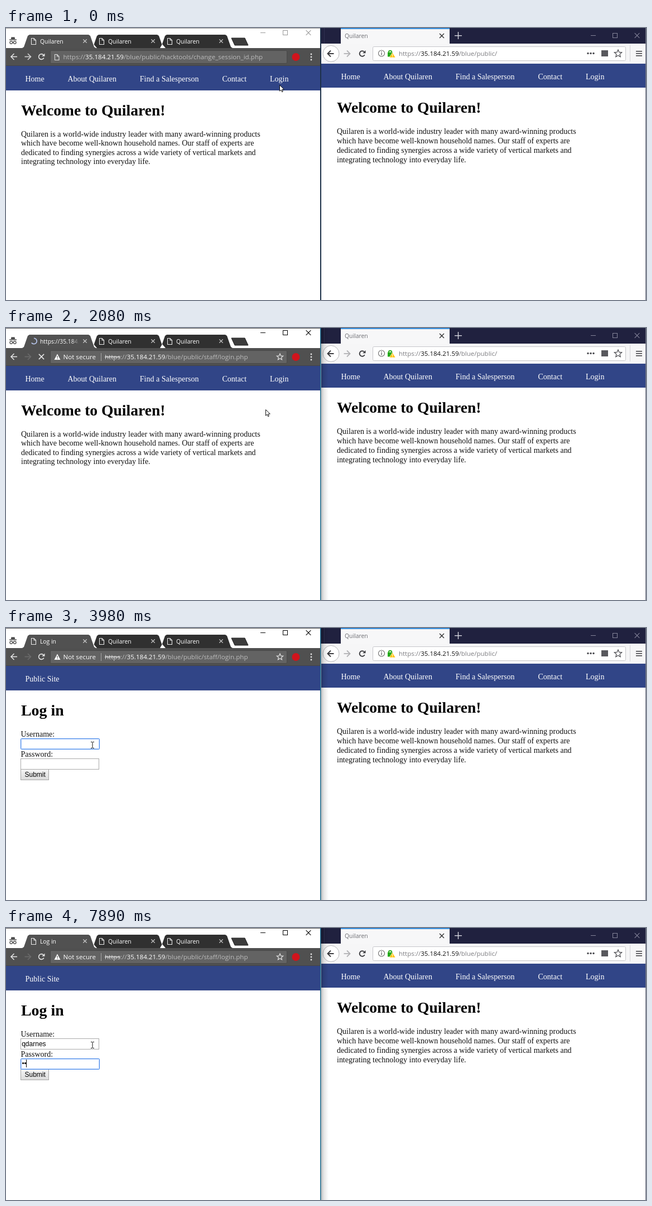
An HTML page with a canvas for the animation above (8 s loop, 1147 by 488 pixels).

```html
<!DOCTYPE html>
<html lang="en">
<head>
<meta charset="utf-8">
<title>Two browser windows</title>
<style>
html, body { margin: 0; width: 100%; height: 100%; overflow: hidden; background: #fff; }
canvas { display: block; width: 1147px; height: 488px; }
</style>
</head>
<body>
<canvas id="stage" width="1147" height="488"></canvas>
<script>
const ctx = document.getElementById('stage').getContext('2d');
const LOOP = 8000;
const BRAND = 'Quilaren', USER = 'qdarnes';
const SERIF = '"Liberation Serif", serif';
const SANS = '"Liberation Sans", sans-serif';
const UI = '"Open Sans", sans-serif';
const NAV = '#314587';

// Each entry is [start time, value]; the latest one reached is returned.
const CURSOR = [
  [0, ['arrow', 490, 102]], [150, ['arrow', 490, 79]], [710, ['hand', 488, 88]],
  [830, ['hand', 486, 94]], [1290, ['hand', 484, 98]], [1930, ['arrow', 467, 139]],
  [2080, ['arrow', 465, 146]], [2640, ['arrow', 336, 184]], [2780, ['arrow', 186, 209]],
  [2930, ['beam', 161, 210]], [3050, ['beam', 155, 210]]
];
const SPINNER = [
  [1570, [1.3, 1.55]], [1690, [1.15, 1.5]], [1810, [1, 1.45]],
  [1930, [-0.5, 0.3]], [2080, [-0.5, 0.8]], [2230, [-0.5, 0.95]]
];
const TYPED = [[0, 0], [4250, 1], [4380, 2], [4810, 3], [4960, 4], [5110, 6], [5240, 7]];
const DOTS = [[0, 0], [6220, 1], [6920, 2], [7640, 1], [7890, 2]];
const CARET = [
  [0, false], [3450, true], [3980, false], [4250, true], [5510, true], [6100, false],
  [6220, true], [6780, false], [6920, true], [7490, false], [7890, true]
];

function at(track, t) {
  let value = null;
  for (const [start, v] of track) if (t >= start) value = v;
  return value;
}

function rect(x, y, w, h, color) {
  ctx.fillStyle = color;
  ctx.fillRect(x, y, w, h);
}

function box(x, y, w, h, color, lineWidth = 1) {
  ctx.strokeStyle = color;
  ctx.lineWidth = lineWidth;
  ctx.strokeRect(x + lineWidth / 2, y + lineWidth / 2, w - lineWidth, h - lineWidth);
}

function rounded(x, y, w, h, r, fill, stroke) {
  ctx.beginPath();
  ctx.roundRect(x, y, w, h, r);
  paint(fill, stroke);
}

function paint(fill, stroke, width = 1) {
  if (fill) { ctx.fillStyle = fill; ctx.fill(); }
  if (stroke) { ctx.strokeStyle = stroke; ctx.lineWidth = width; ctx.stroke(); }
}

function path(points, fill, stroke, width, closed = !!fill) {
  ctx.beginPath();
  for (let i = 0; i < points.length; i += 2) ctx.lineTo(points[i], points[i + 1]);
  if (closed) ctx.closePath();
  paint(fill, stroke, width);
}

function circle(x, y, r, fill, stroke, width) {
  ctx.beginPath();
  ctx.arc(x, y, r, 0, 2 * Math.PI);
  paint(fill, stroke, width);
}

function text(str, x, y, font, color) {
  ctx.font = font;
  ctx.fillStyle = color;
  ctx.fillText(str, x, y);
  return x + ctx.measureText(str).width;
}

function cross(x, y, r, color, width) {
  path([x - r, y - r, x + r, y + r], null, color, width);
  path([x + r, y - r, x - r, y + r], null, color, width);
}

function arrowIcon(x, y, dir, color, width = 1.6) {
  path([x - 5.5 * dir, y, x + 5.5 * dir, y], null, color, width);
  path([x, y - 5.5, x + 5.5 * dir, y, x, y + 5.5], null, color, width);
}

function reloadIcon(x, y, color, width = 1.7) {
  ctx.beginPath();
  ctx.arc(x, y, 4.8, 0.15 * Math.PI, 1.75 * Math.PI);
  paint(null, color, width);
  path([x + 6, y - 6, x + 6, y - 0.8, x + 0.8, y - 0.8], color);
}

function pageIcon(x, y, w, h, color) {
  path([x, y, x + w - 3.5, y, x + w, y + 3.5, x + w, y + h, x, y + h], null, color, 1.1, true);
  path([x + w - 3.5, y, x + w - 3.5, y + 3.5, x + w, y + 3.5], null, color, 1);
}

function star(x, y, r, color) {
  const points = [];
  for (let i = 0; i < 10; i++) {
    const a = -Math.PI / 2 + i * Math.PI / 5, d = i % 2 ? r * 0.45 : r;
    points.push(x + d * Math.cos(a), y + d * Math.sin(a));
  }
  path(points, null, color, 1.2, true);
}

function windowButtons(min, max, close, y, color) {
  rect(min - 4, y, 9, 1, color);
  box(max - 4, y - 4, 9, 9, color);
  cross(close, y + 0.5, 4.3, color, 1.1);
}

function address(x, y, size, rest, dim, bright) {
  const font = size + 'px ' + UI;
  x = text('://', x, y, font, dim);
  x = text('35.184.21.59', x, y, font, bright);
  text(rest, x, y, font, dim);
}

function navLinks(x, y) {
  const labels = ['Home', 'About ' + BRAND, 'Find a Salesperson', 'Contact', 'Login'];
  const offsets = [0, 76, 205.3, 353, 438.5];
  labels.forEach((s, i) => text(s, x + offsets[i], y, '14px ' + SERIF, '#fff'));
}

function welcome(x, y, lead, step) {
  text('Welcome to ' + BRAND + '!', x, y, 'bold 27.6px ' + SERIF, '#000');
  [
    BRAND + ' is a world-wide industry leader with many award-winning products',
    'which have become well-known household names. Our staff of experts are',
    'dedicated to finding synergies across a wide variety of vertical markets and',
    'integrating technology into everyday life.'
  ].forEach((s, i) => text(s, x, y + lead + i * step, '13.97px ' + SERIF, '#111'));
}

function tabShape(x, right, color) {
  path([x, 36, x + 3, 34, x + 10, 14, x + 13, 12, right - 13, 12,
    right - 10, 14, right - 3, 34, right, 36], color);
}

function tab(x, title, loading) {
  if (loading) {
    ctx.beginPath();
    ctx.arc(x + 20, 23.5, 5.2, loading[0] * Math.PI, loading[1] * Math.PI);
    paint(null, loading[0] < 0 ? '#b3c1e6' : '#e2e2e2', 1.8);
  } else {
    pageIcon(x + 15.5, 18.5, 8, 11, '#e8e8e8');
  }
  const fade = ctx.createLinearGradient(x + 88, 0, x + 101, 0);
  fade.addColorStop(0, 'rgba(255,255,255,1)');
  fade.addColorStop(1, 'rgba(255,255,255,0)');
  text(title, x + 31, 27.5, '10.35px ' + UI, fade);
  cross(x + 111.5, 23.5, 3.2, '#d6d6d6', 1.2);
}

function incognito() {
  const c = '#444';
  path([8.5, 20, 10, 16, 12.5, 16.8, 15, 16, 16.5, 20], c);
  rect(6, 20.5, 13, 1.4, c);
  circle(9.3, 26, 2.4, null, c, 1.2);
  circle(15.7, 26, 2.4, null, c, 1.2);
  rect(11.5, 25, 2, 1, c);
}

function leftChrome(t) {
  const loading = t >= 1570 && t < 2380;
  const moved = t >= 1930;
  const focused = t >= 1290;
  rect(0, 0, 563, 36, '#fff');
  rect(0, 0, 563, 1, focused ? '#555' : '#999');
  windowButtons(460, 500, 542, 8, focused ? '#000' : '#999');
  incognito();
  tabShape(275, 406, '#303030');
  tabShape(153, 284, '#303030');
  path([153, 36, 157, 29, 163, 36], '#fff');
  path([276, 36, 280, 29, 286, 36], '#fff');
  tabShape(29, 161, '#515151');
  path([404, 18, 428, 18, 434, 31, 410, 31], '#3c3c3c', '#222', 1);
  const title = !moved ? BRAND : t < 2380 ? 'https://35.184.21.59' : 'Log in';
  tab(30, title, loading ? at(SPINNER, t) : null);
  tab(152, BRAND);
  tab(274, BRAND);

  rect(0, 36, 563, 32, '#505050');
  rect(0, 67, 563, 1, '#444');
  arrowIcon(14.5, 51.5, -1, '#e4e4e4');
  arrowIcon(39, 51.5, 1, moved ? '#6b6b6b' : '#cfcfcf');
  if (loading) cross(63.5, 51.5, 4.6, '#e4e4e4', 1.6);
  else reloadIcon(63.5, 51.5, '#e4e4e4');
  rounded(79.5, 40.5, 424, 23, 2, '#636363', '#484848');

  const font = '11.6px ' + UI, dim = '#bdbdbd';
  if (moved) {
    path([92, 46.5, 97.5, 57, 86.5, 57], '#fff');
    rect(91.4, 50, 1.3, 3.6, '#636363');
    rect(91.4, 54.5, 1.3, 1.3, '#636363');
    text('Not secure', 102.5, 56, font, '#fff');
    rect(170, 45, 1, 14, '#a8a8a8');
    const end = text('https', 177, 56, font, '#d8d8d8');
    rect(177, 51.5, end - 177, 1.2, '#e8e8e8');
    address(end, 56, 11.6, '/blue/public/staff/login.php', dim, '#fff');
    star(491, 52, 6, '#e0e0e0');
  } else {
    pageIcon(87.5, 47.5, 7.5, 10, '#dedede');
    const end = text('https', 102.5, 56, font, dim);
    address(end, 56, 11.6, '/blue/public/hacktools/change_session_id.php', dim, '#fff');
  }
  circle(519.5, 52, 7, '#d0141c');
  for (const y of [47, 52, 57]) circle(547, y, 1.4, '#e4e4e4');
}

function field(y, focused) {
  if (focused) {
    rounded(26.5, y + 0.5, 141, 19, 1, '#fff', '#3f83e6');
    box(27, y + 1, 140, 18, 'rgba(77,144,254,.35)');
  } else {
    rect(26, y, 141, 20, '#fff');
    box(26, y, 141, 20, '#aaa');
  }
}

function loginPage(t) {
  text('Public Site', 34.5, 96, '14px ' + SERIF, '#fff');
  text('Log in', 27, 157, 'bold 27.9px ' + SERIF, '#000');
  text('Username:', 26.5, 195, '14px ' + SERIF, '#111');
  text('Password:', 26.5, 231, '14px ' + SERIF, '#111');
  const inUser = t >= 3450 && t < 5510, inPass = t >= 5510;
  field(198, inUser);

  const shade = ctx.createLinearGradient(0, 253, 0, 272);
  shade.addColorStop(0, '#f6f6f6');
  shade.addColorStop(1, '#dcdcdc');
  rect(26, 253, 51, 20, shade);
  box(26, 253, 51, 20, '#a6a6a6');
  text('Submit', 33.5, 267, '12px ' + SANS, '#000');
  field(234, inPass);

  const typed = USER.slice(0, at(TYPED, t));
  const userEnd = text(typed, 28.2, 212, '12px ' + SANS, '#000');
  const dots = at(DOTS, t);
  for (let i = 0; i < dots; i++) circle(30.6 + i * 3.9, 242.6, 1.55, '#000');
  if (at(CARET, t)) {
    if (inUser) rect(typed ? Math.floor(userEnd - 0.6) : 29, 201, 1, 14, '#000');
    if (inPass) rect(dots ? 28 + 4 * dots : 29, 236, 1, 14, '#000');
  }
}

function leftPage(t) {
  rect(0, 68, 563, 420, '#fff');
  rect(0, 68, 563, 44, NAV);
  if (t >= 2230) {
    loginPage(t);
  } else {
    navLinks(34.5, 96);
    welcome(27, 157, 38, 16.25);
  }
}

function rightWindow() {
  rect(563, 0, 584, 488, '#fff');
  rect(563, 0, 584, 28, '#20213f');
  rect(570, 0, 1, 28, '#2f3150');
  rect(600, 0, 195, 28, '#f7f7f8');
  rect(600, 0, 195, 2, '#3a8fdc');
  text(BRAND, 607, 18, '10.35px ' + UI, '#6d6d72');
  cross(781, 14, 4, '#333', 1.4);
  rect(804, 13, 13, 1.4, '#d5d5de');
  rect(809.8, 7, 1.4, 13, '#d5d5de');
  windowButtons(1052, 1091, 1131, 13, '#85859a');

  rect(565, 28, 582, 36, '#f6f6f7');
  circle(582.5, 46, 14.5, '#fff', '#b5b5b8', 1);
  arrowIcon(582, 46, -1, '#3b3b3f', 2);
  arrowIcon(611, 46, 1, '#b2b2b5', 1.8);
  reloadIcon(638.5, 46, '#3b3b3f', 1.9);
  rounded(657.5, 33.5, 453, 25, 2, '#fff', '#c6c6ca');
  circle(673, 45.5, 5.5, null, '#666', 1.1);
  rect(672.4, 44.5, 1.3, 4, '#555');
  rect(672.4, 42, 1.3, 1.4, '#555');
  ctx.beginPath();
  ctx.arc(688.5, 43.5, 2.8, Math.PI, 2 * Math.PI);
  paint(null, '#23a818', 1.7);
  rect(684, 43.5, 9, 8, '#23a818');
  path([692.5, 44, 698, 53, 687, 53], '#ffc40c', '#fff', 0.6);
  rect(692, 47, 1.1, 3, '#fff');
  rect(692, 51, 1.1, 1, '#fff');
  const end = text('https', 704, 50, '11.5px ' + UI, '#7c7c80');
  address(end, 50, 11.5, '/blue/public/', '#7c7c80', '#111');
  for (const x of [1043, 1048, 1053]) circle(x, 45.5, 1.7, '#4a4a4f');
  rect(1067, 40, 12, 11, '#58585d');
  star(1097, 46, 7, '#4a4a4f');
  rect(1118, 31, 1, 29, '#d4d4d8');
  for (const y of [41, 45, 49]) rect(1129, y, 11, 1.5, '#3b3b3f');

  rect(565, 64, 582, 43, NAV);
  navLinks(600.5, 92);
  welcome(593, 152, 38.3, 16.8);
  rect(1146, 0, 1, 488, '#6c6f80');
}

function divider(focused) {
  if (!focused) {
    rect(563, 0, 2, 488, '#1d3049');
    return;
  }
  const shade = ctx.createLinearGradient(564, 0, 578, 0);
  shade.addColorStop(0, 'rgba(0,0,0,.28)');
  shade.addColorStop(0.4, 'rgba(0,0,0,.1)');
  shade.addColorStop(1, 'rgba(0,0,0,0)');
  rect(564, 0, 14, 488, shade);
  rect(563, 0, 1.5, 488, '#1c6c90');
}

const POINTERS = {
  arrow() {
    path([0.5, 0.5, 0.5, 11.2, 3, 9, 4.7, 12.8, 6.4, 12, 4.8, 8.3, 8.3, 8.1], '#fff', '#111', 1);
  },
  hand() {
    path([3.5, 1.5, 4.5, 0.6, 5.6, 1.5, 5.6, 5.6, 7.3, 5.3, 8.2, 6.3, 9.6, 6.2, 10.5, 7.4,
      10.5, 11.5, 9.3, 15.4, 4, 15.4, 1, 10.7, 0.5, 8.8, 1.6, 8.2, 3.5, 10], '#fff', '#111', 1);
    path([5.6, 5.6, 5.6, 8.2], null, '#111', 0.8);
    path([8, 6.3, 8, 8.6], null, '#111', 0.8);
  },
  beam() {
    rect(-0.5, -5, 1, 10, '#111');
    for (const y of [-6, 5]) {
      rect(-3, y, 2.5, 1, '#111');
      rect(0.5, y, 2.5, 1, '#111');
    }
  }
};

function pointer(t) {
  const [kind, x, y] = at(CURSOR, t);
  ctx.save();
  ctx.translate(x, y);
  POINTERS[kind]();
  ctx.restore();
}

function draw(now) {
  const t = now % LOOP;
  rightWindow();
  leftPage(t);
  leftChrome(t);
  divider(t >= 1290);
  pointer(t);
}

const begin = performance.now();
function tick() {
  draw(performance.now() - begin);
  requestAnimationFrame(tick);
}
tick();
</script>
</body>
</html>
```
